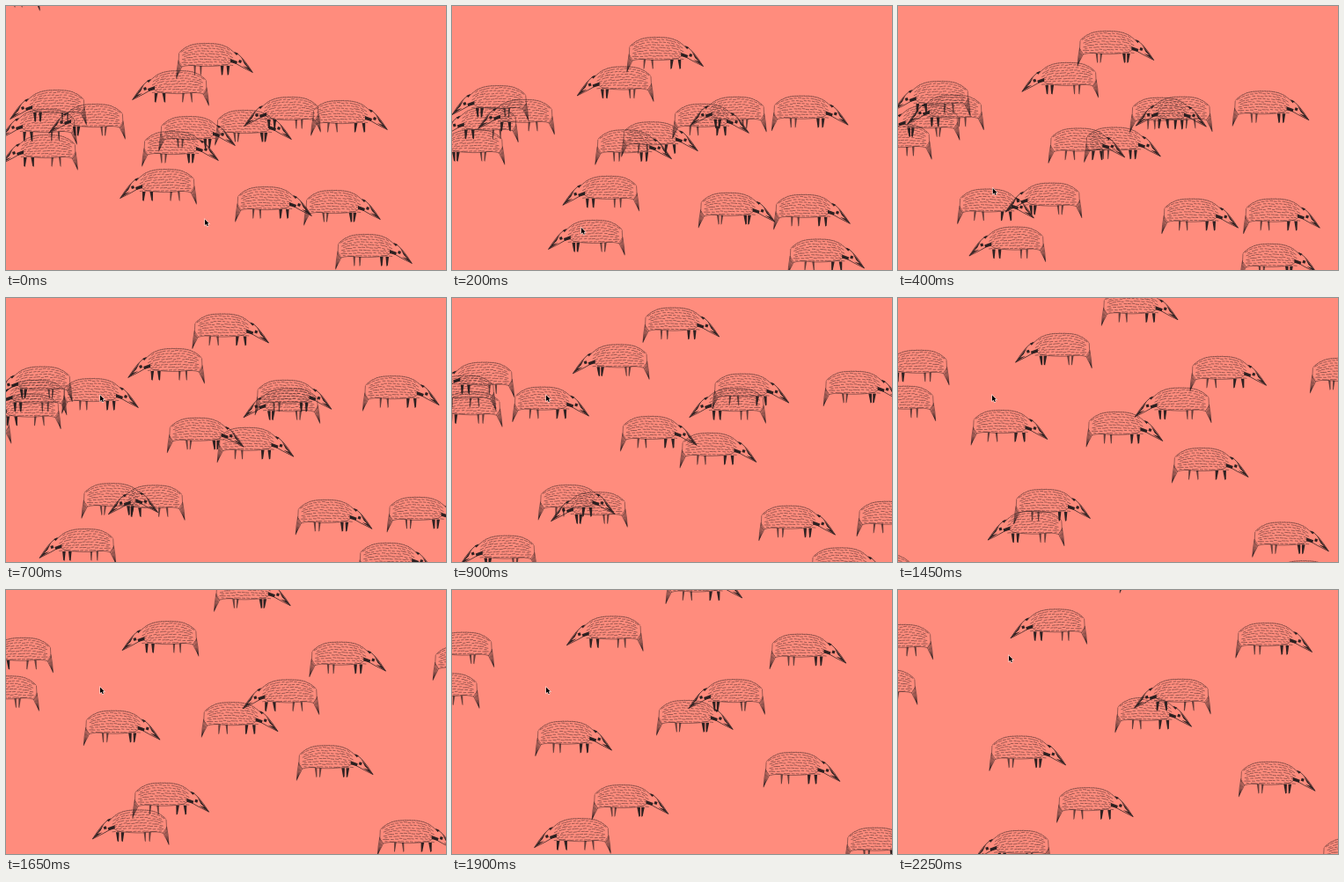
An HTML page with a canvas that plays this animation: 500x300 px, repeating every 2.3 s.

```html
<!DOCTYPE html>
<html lang="en">
<head>
<meta charset="utf-8">
<title>Badgers</title>
<style>
  html, body { margin: 0; width: 100%; height: 100%; overflow: hidden; background: #ff8c7d; }
  canvas { display: block; width: 500px; height: 300px; }
</style>
</head>
<body>
<canvas id="stage" width="500" height="300"></canvas>
<script>
const ctx = document.getElementById('stage').getContext('2d');
const LOOP = 2300, STEP = 50;
const PAPER = '#ff8c7d', INK = '#241c1e';
const CENTER = { x: 44, y: 20 };

// Walkers already out: centre and speed in px/s
const herd = [
  [237, 62, 26, -35], [187, 93, -7, -23], [48, 115, -23, -25], [92, 131, -95, -26],
  [37, 137, -26, -12], [38, 166, -108, -30], [198, 162, 41, -9], [217, 145, 95, 31],
  [173, 205, -19, 39], [304, 225, 98, 34], [382, 229, 135, 24], [418, 279, 36, 27],
  [390, 127, 84, -27], [314, 123, -1, -1], [281, 138, 65, -36], [-5, -15, -40, -40]
].map(([x, y, vx, vy]) => ({ x, y, vx, vy, born: 0 }));

// Pointer stops: time, x, y
const stops = [
  [0, 226, 243], [150, 160, 261], [350, 108, 227],
  [650, 107, 111], [2000, 107, 111], [2250, 126, 75]
];

function pointerAt(t) {
  const i = Math.max(1, stops.findIndex(s => s[0] >= t));
  const [t0, x0, y0] = stops[i - 1], [t1, x1, y1] = stops[i];
  const k = (t - t0) / (t1 - t0);
  return { x: x0 + (x1 - x0) * k, y: y0 + (y1 - y0) * k };
}

// Each click drops a new walker under the pointer
const drop = (born, vx, vy) => ({ ...pointerAt(born), vx, vy, born });
const badgers = [...herd, drop(150, -143, 38), drop(350, 61, 9), drop(700, 26, 48)];

let seed = 7;
const rand = () => (seed = (seed * 16807) % 2147483647) / 2147483647;

const BACK = 35, HALF = 32, BELLY = 25.5;
const dome = x => 0.8 + 11 * Math.abs((x - BACK) / HALF) ** 3;
const between = (x, k) => dome(x) * (1 - k) + BELLY * k;

// Rows of hairs that blend from the curve of the back to the belly
function makeFur() {
  const fur = new Path2D(), rows = 8;
  for (let row = 0; row < rows; row++) {
    const k = (row + 0.7) / rows;
    for (let x = 6 + (row % 2) * 2.4; x < 62; x += 4.7) {
      const px = x + rand() * 1.6, end = px + 2.2 + rand() * 1.3;
      const lift = rand() - 0.5;
      fur.moveTo(px, between(px, k) + lift);
      fur.lineTo(end, between(end, k) + lift + 0.3);
    }
  }
  return fur;
}

function makeOutline() {
  const line = new Path2D('M7 27Q14 24.5 24 26T54 25.5Q60 25 64 21M3 23L3.6 12');
  for (let x = 4; x < 67; x += 2.6) {
    line.moveTo(x, dome(x));
    line.lineTo(x + 2.4, dome(x + 2.4) - rand() * 0.5);
  }
  return line;
}

function makeTail() {
  const tail = new Path2D();
  for (let i = 0; i < 5; i++) {
    tail.moveTo(3 + i, 20 + i * 1.6);
    tail.quadraticCurveTo(1 + i * 1.2, 30, 0.6 + i * 0.3, 40 - i * 0.8);
  }
  return tail;
}

const fur = makeFur(), outline = makeOutline(), tail = makeTail();
const face = new Path2D('M68 11Q75 14 87.3 33.5Q74 27 64 21');
const stripes = new Path2D('M74 16L87.6 33.8L78 24ZM62 18L70 21L69 24L62 22ZM76 26L82 28L87.6 33.8Z');
const marks = new Path2D('M66 10L71 12L69 14ZM72 19L75 20L74 23L71 22Z');

function leg(x, lean, w) {
  ctx.beginPath();
  ctx.moveTo(x - w, 26);
  ctx.lineTo(x + w, 26);
  ctx.lineTo(x + lean + w * 0.4, 36);
  ctx.lineTo(x + lean - w * 0.4, 36.8);
  ctx.fill();
}

function legPair(x, w, swing) {
  const gap = 3.4 + swing;
  leg(x - gap, -swing, w);
  leg(x + gap, swing, w);
}

function drawBadger(b, t, i) {
  const s = (t - b.born) / 1000;
  const swing = Math.sin(t / 600 * Math.PI * 2 + i * 1.7);
  ctx.save();
  ctx.translate(b.x + b.vx * s, b.y + b.vy * s);
  ctx.scale(Math.sign(b.vx), 1);
  ctx.translate(-CENTER.x, -CENTER.y);
  ctx.strokeStyle = ctx.fillStyle = INK;
  ctx.lineCap = ctx.lineJoin = 'round';

  ctx.globalAlpha = 0.7;
  ctx.lineWidth = 0.65;
  ctx.stroke(fur);
  ctx.stroke(outline);
  ctx.lineWidth = 0.75;
  ctx.stroke(tail);
  legPair(25, 1.2, swing);

  ctx.globalAlpha = 0.95;
  legPair(56, 1.8, swing);
  ctx.stroke(face);
  ctx.fill(stripes);
  ctx.fill(marks);
  ctx.restore();
}

const arrow = new Path2D('M0 0V6.5L1.6 5.2L2.8 7.8L3.8 7.2L2.8 4.8H4.7Z');

function drawPointer(t) {
  const { x, y } = pointerAt(t);
  ctx.save();
  ctx.translate(x, y - 0.5);
  ctx.strokeStyle = 'rgba(255,240,236,.8)';
  ctx.lineWidth = 1.2;
  ctx.stroke(arrow);
  ctx.fillStyle = '#000';
  ctx.fill(arrow);
  ctx.restore();
}

function draw(t) {
  ctx.fillStyle = PAPER;
  ctx.fillRect(0, 0, 500, 300);
  badgers.forEach((b, i) => { if (t >= b.born) drawBadger(b, t, i); });
  drawPointer(t);
}

const start = performance.now();
function tick() {
  const t = (performance.now() - start) % LOOP;
  draw(Math.floor(t / STEP) * STEP);
  requestAnimationFrame(tick);
}
tick();
</script>
</body>
</html>
```
